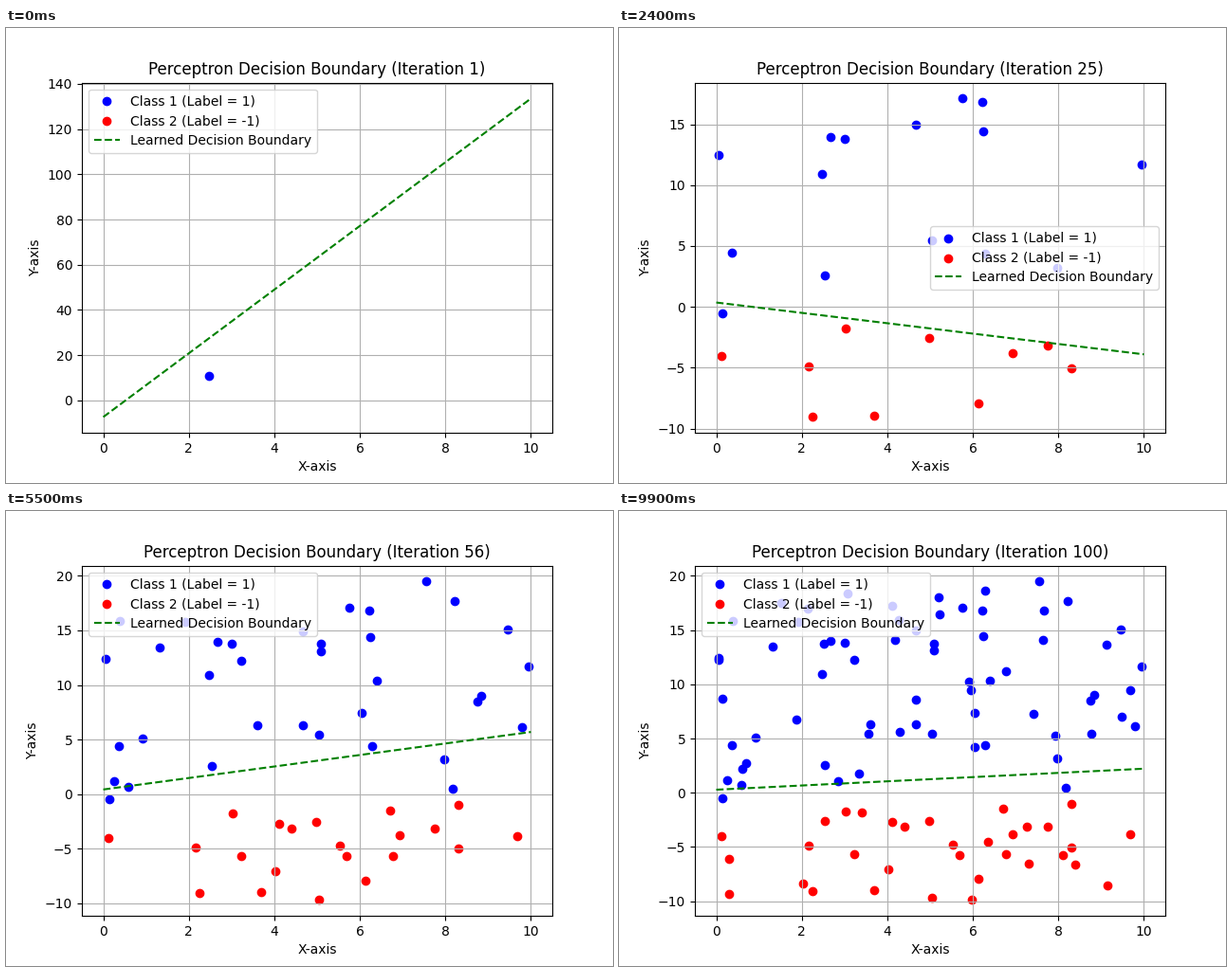
Write a matplotlib script that moves like this. It is 640 by 480 pixels and loops after 10000 ms.

```python
import numpy as np
import matplotlib.pyplot as plt
from matplotlib.animation import FuncAnimation

STEPS = 100

# Samples that turn the line or widen the y range, by iteration
KEY_SAMPLES = {
    1: (2.473, 10.91), 2: (5.755, 17.11), 3: (2.25, -9.05),
    17: (0.144, -0.5), 30: (5.045, -9.7), 35: (8.306, -1.02),
    39: (8.217, 17.72), 50: (7.55, 19.48),
    74: (5.977, -9.89), 75: (2.85, 1.07),
}
rng = np.random.default_rng(7)


def classify(y):
    return 1 if y > -0.8 else -1


def margin(w, x, y):
    """Positive when the line puts the sample on its own side."""
    return classify(y) * (w @ (x, y, 1))


def ordinary_sample(w, low, high):
    """A random sample that the current line already gets right."""
    while True:
        x, y = rng.uniform(0, 10), rng.uniform(low, high)
        if margin(w, x, y) > 0:
            return x, y


def train(w):
    """Online perceptron; returns samples, labels and weights per step."""
    points, weights = [], []
    for step in range(1, STEPS + 1):
        if step in KEY_SAMPLES:
            x, y = KEY_SAMPLES[step]
        else:
            seen_y = [p[1] for p in points]
            x, y = ordinary_sample(w, min(seen_y), max(seen_y))
        if margin(w, x, y) <= 0:
            w = w + classify(y) * np.array([x, y, 1])
        points.append((x, y))
        weights.append(w)
    labels = [classify(y) for _, y in points]
    return np.array(points), np.array(labels), weights


points, labels, weights = train(np.array([5.578, -0.396, -2.907]))
line_x = np.linspace(0, 10, 100)

fig, ax = plt.subplots(figsize=(6.4, 4.8), dpi=100)


def update(i):
    ax.clear()
    step = i + 1
    seen, kind = points[:step], labels[:step]
    for label, color, name in ((1, "blue", "Class 1 (Label = 1)"),
                               (-1, "red", "Class 2 (Label = -1)")):
        ax.scatter(*seen[kind == label].T, color=color, label=name)
    wx, wy, bias = weights[i]
    ax.plot(line_x, -(wx * line_x + bias) / wy, "g--",
            label="Learned Decision Boundary")
    ax.set_xlabel("X-axis")
    ax.set_ylabel("Y-axis")
    ax.set_title(f"Perceptron Decision Boundary (Iteration {step})")
    ax.legend(loc="center right" if 15 <= step < 35 else "upper left")
    ax.grid(True)


anim = FuncAnimation(fig, update, frames=STEPS, interval=100,
                     init_func=lambda: update(0), repeat=True)
plt.show()
```
